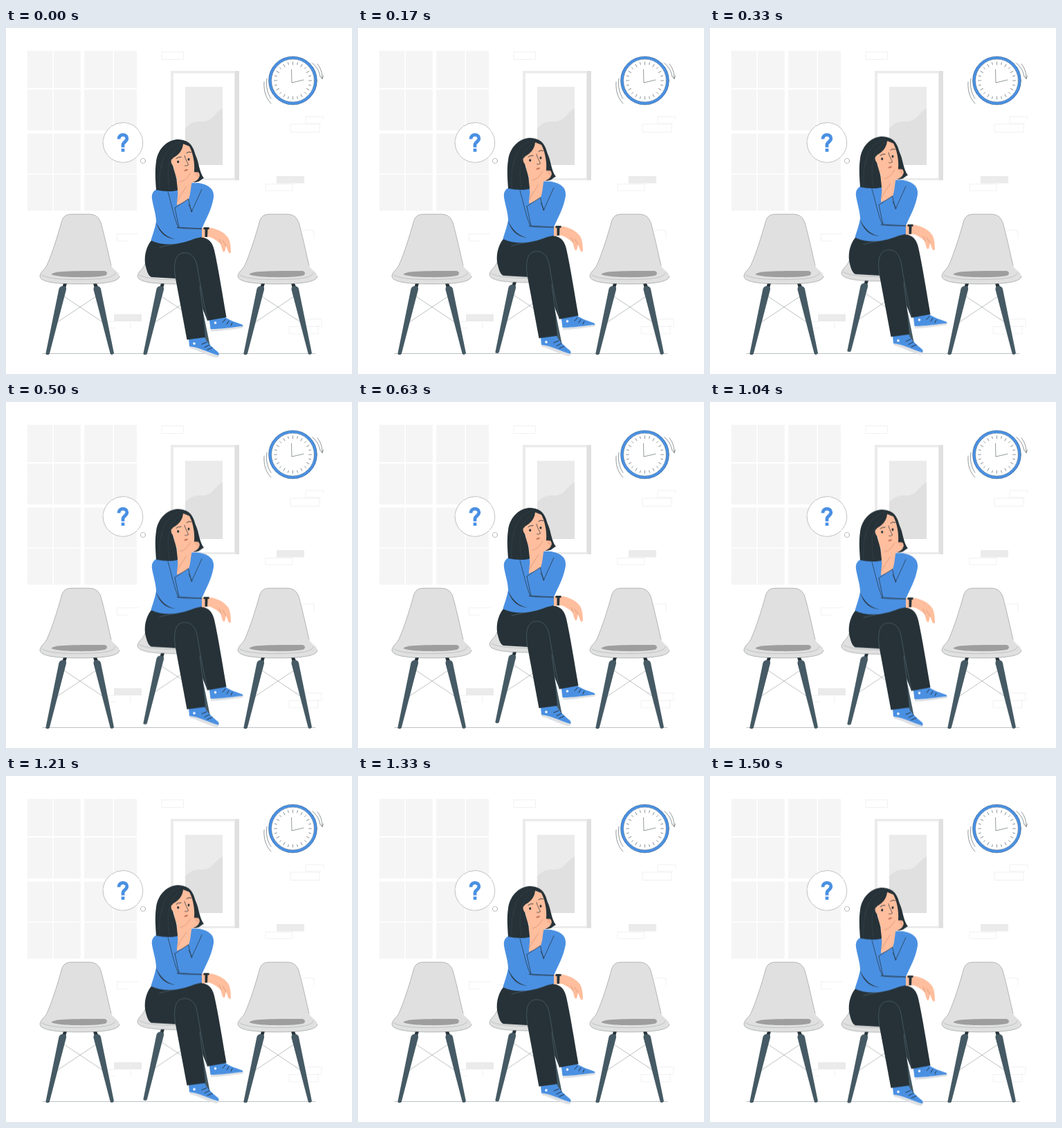
These frames come from a looping animation (500x500 px, 1.54 s). An HTML page:

```html
<!DOCTYPE html>
<html lang="en">
<head>
<meta charset="utf-8">
<title>Waiting</title>
<style>
  html, body { margin: 0; width: 100%; height: 100%; overflow: hidden; background: #fff; }
  svg { display: block; width: 100vw; height: 100vh; }
  .pane { fill: #f5f5f5; }
  .brick { fill: none; stroke: #ebebeb; stroke-width: .7; }
  .pale { fill: #ebebeb; }
  .blue { fill: #4a90e2; }
  .dark { fill: #263238; }
  .skin { fill: #ffbe9d; }
  .leg { fill: #455a64; }
  .line { fill: none; stroke: #263238; stroke-width: .7; stroke-linecap: round; stroke-linejoin: round; }
  .thin { stroke-width: .5; }
  .faint { stroke-width: .5; stroke-opacity: .6; }
  .fold { stroke: #5b6f79; stroke-width: .6; }
  .lock { stroke: #3b4850; stroke-width: .5; }
  .crease { stroke: #b87a60; stroke-width: .45; }
  .white { fill: #fff; }
  .sole { fill: #dfe1e4; }
</style>
</head>
<body>
<svg viewBox="0 0 500 500" xmlns="http://www.w3.org/2000/svg">
  <defs>
    <g id="chair">
      <path class="dark" d="M83 369H88L86 376H81ZM126 369H131L134 376H128Z"/>
      <path class="line faint" d="M84 388L141 426M130 388L73 426"/>
      <path class="leg" d="M76.500 377Q78 373 82 373Q88 373 87 378L62.800 471Q60 473.500 57.300 471Z"/>
      <path class="leg" d="M126.500 378Q126 373 131 373Q136 373 137 377L156 470Q153.500 473.500 150.800 471Z"/>
      <path fill="#e0e0e0" d="M49 358C51 351 56 349 59 343C67 325 75 299 80 281C82 273 86 269 95 269H119C129 269 134 273 137 281C142 298 147 322 152 343C154 350 163 351 164 359C163 367 142 370 106 370C70 370 49 367 49 358Z"/>
      <path class="line faint" d="M164 359C163 367 142 370 106 370C70 370 49 367 49 358C51 351 56 349 59 343C67 325 75 299 80 281C82 273 86 269 95 269H119C129 269 134 273 137 281C142 298 147 322 152 343"/>
      <path class="line faint" style="stroke-opacity:.35" d="M52 357C62 363 88 364 112 363.500C139 363 156 361 158 354"/>
      <path fill="#9e9e9e" d="M65.500 356C70 351 92 351 142 351C146 351.500 147.500 355 144 357.500C136 361 75 361.500 65.500 356Z"/>
    </g>
  </defs>

  <g id="panes"></g>
  <g id="bricks"></g>

  <path class="pale" d="M238 62H331V220H238Z"/>
  <path fill="#e0e0e0" d="M331 62H337V220H331Z"/>
  <path class="white" d="M242 65.500H330V217H242Z"/>
  <path class="pale" d="M259 85H313V198H259Z"/>
  <path fill="#e0e0e0" d="M259 145C266 137 274 134.500 283 135C299 136 302 121 313 116V198H259Z"/>

  <g>
    <circle class="white" cx="414.500" cy="76" r="33"/>
    <circle cx="414.500" cy="76" r="33" fill="none" stroke="#4a90e2" stroke-width="4.200"/>
    <circle class="line faint" cx="414.500" cy="76" r="35"/>
    <circle class="line faint" cx="414.500" cy="76" r="30.800"/>
    <g id="ticks"></g>
    <path class="line thin" d="M412.500 60L413 79L430 75"/>
    <path class="line thin" d="M377 73C375 84 378 95 383 102M373 78C372 91 376 102 383 109M443 51C450 57 453 64 454 70M450 52C455 58 457 65 457 73M454.500 70L457 73.500L458.500 69"/>
  </g>

  <path class="line faint" d="M53 470.500H447"/>

  <circle class="white" cx="169" cy="165.500" r="29"/>
  <circle class="line faint" cx="169" cy="165.500" r="28.800" stroke-dasharray="22 1.500"/>
  <circle class="line faint" cx="198" cy="192" r="3.600" style="fill:#fff"/>
  <path d="M163 160.500C163 156.500 165.500 154.300 169 154.300C172.500 154.300 174.800 156.500 174.800 159.500C174.800 164.500 169 164.500 169 169V172.500" fill="none" stroke="#4a90e2" stroke-width="4.800"/>
  <path class="blue" d="M166.600 174.300H171.400V178.800H166.600Z"/>

  <use href="#chair"/>
  <use href="#chair" x="286"/>

  <g id="sitter">
    <use href="#chair" x="141"/>

    <!-- shoes -->
    <path class="sole" d="M264.500 458L266 463C276 465 292 474 304 476.500Q308.500 475.500 308 471Z"/>
    <path class="blue" d="M264 449L287 446.500C290 455 300 463 306 468Q309 471 306.500 473C294 470 279 461 265 460Z"/>
    <path class="sole" d="M296 433V438.500C312 438 328 435.500 342 433.500Q344 432 342 429Z"/>
    <path class="blue" d="M293.500 419L315 416.500C321 422 334 426 341 428.500Q343.500 430 341.500 431C326 432.500 312 435 295.500 435Z"/>
    <circle class="white" cx="272" cy="456" r="1.800"/>
    <circle class="white" cx="302.500" cy="426" r="1.800"/>
    <path class="line" style="stroke-width:1" d="M283 457L290 454M287 461.500L294 458M291 465L298 462M313 425.500L317 421M319 428L322 423.500M325 430L327 426"/>

    <!-- trousers -->
    <path class="dark" d="M210 307C201 318 199 334 202 345C204 353 206 358 210 360L245 362L261.500 450.500L288 447L284 405L291 423L318.500 418C313 386 307 348 301 321C298 309 293 304 282 302L240 300Z"/>
    <path class="line fold" d="M245 362C242 343 243 326 257 325C270 324 275 335 277 348C281 374 287 402 291 422M222 317C238 312 256 311 273 304M280 373L285 410"/>

    <!-- jumper -->
    <path class="blue" d="M222 231C213 234 210 239 211 247C213 259 217 270 217 280C215 291 211 301 209.500 307C228 316 252 313 272 304.500L283 302V290C289 276 297 263 300 245C301 233 294 227 279 224L248 223Z"/>
    <path class="skin" d="M247 218L270 219C266 228 268 240 263 249L247 256C247 246 250 239 247 232Z"/>
    <path class="line crease" d="M262 226C259 233 252 240 248 250"/>
    <path class="blue" d="M244 260L263.500 247L269 266L262 287L250 291Z"/>
    <path class="line" d="M244 260L263.500 247L268 266L283 233M244 260L250 288M234 237C239 254 243 275 249 288L283 290M269 265L264 255"/>
    <path class="dark" d="M217 281C221 294 229 304 245 305C232 303 223 294 217 281Z"/>
    <path class="line" d="M247 288.500C259 290.500 270 290 284 290"/>

    <!-- forearm and watch -->
    <path class="skin" d="M283 289L294 288.500C305 290 315 295 321 303C324.500 309 325 318 325 324.500Q322.500 327 321 323L318 315L316.500 322Q315 325 313 322L310 312C306 308 300 304 294 302L283 303Z"/>
    <path class="line crease" d="M313 307L318 315M308 305L311 312"/>
    <path class="dark" d="M285.500 288H293.500V291H291.500L291 302H287.500V291H285.500Z"/>

    <!-- head -->
    <path class="dark" d="M250 162C268 162 271 174 274 184C279 194 279 208 286 217C281 219 280 223 272 223L255 220Z"/>
    <path class="skin" d="M240 186L255 167L265 171C270 180 273 195 272 207C269 215 263 221 257 222.500C251 223 247 219 244 211Z"/>
    <path class="skin" d="M252 221C260 221 263 213 266 210C268 206 271 207 272 208L278 208.500Q281 212 279 216C276 222 270 222 267 225L261 229H252Z"/>
    <path class="line crease" d="M252 222C260 221 264 213 267 209M272 209Q277 208 277.500 212M274 212Q278 212 278 216"/>
    <path class="dark" d="M217 234C216 220 215 206 217 193C219 177 230 163 247 161C256 160.500 264 164 268 171C263 167.500 259 167 256 167.500C255 177 250 183 241 188C239 197 244 207 246.500 218C247 226 248 231 248 234.500C238 237 227 236 217 234Z"/>
    <path class="line lock" d="M252 165C238 169 226 182 225 201M239 190C232 197 234 219 236 234M225 196C221 210 222 222 222 233M253 169C245 175 238 182 237 189"/>
    <path class="skin" d="M240.500 189C237 190.500 238.500 198 243 200L245 193Z"/>
    <path class="line" style="stroke-width:.9" d="M246 188.500Q249 186 253 186.500M261 180.500Q264 178 267.500 179.500"/>
    <path class="line" d="M258 184.500C259 190 263 195 263.500 198Q261 199.800 258.500 199"/>
    <path fill="#c2705c" d="M257 206.300Q260 203 263.500 204.500Q260.500 208 257 206.300Z"/>
    <ellipse class="dark" cx="248.700" cy="193.300" rx="1.500" ry="1.900"/>
    <ellipse class="dark" cx="264" cy="189.800" rx="1.500" ry="1.900"/>
  </g>
</svg>
<script>
  const NS = "http://www.w3.org/2000/svg";
  const byId = id => document.getElementById(id);

  function add(parent, tag, attrs) {
    const el = document.createElementNS(NS, tag);
    for (const key in attrs) el.setAttribute(key, attrs[key]);
    parent.append(el);
  }

  // Window panes: [start, size] per column and row
  const cols = [[31, 36.5], [69, 39], [113, 41.5], [156, 33]];
  const rows = [[33, 54], [89, 59], [152.5, 58], [212, 52]];
  for (const [x, width] of cols)
    for (const [y, height] of rows)
      add(byId("panes"), "rect", { x, y, width, height, class: "pane" });

  // Wall bricks
  const bricks = [
    "M225 34.500H256.500V45.500H225Z", "M433 138V128H459V133M433 138H455",
    "M411 139H453V150.500H411Z", "M375 225.500H414V235H375Z",
    "M191 297.500H160.500V308H176", "M428 292H445V303",
    "M148 424.500H157M148 433.500H158M180 425V434",
    "M417 420.500H456V431H448", "M409 431.500H451V442H409Z"
  ];
  for (const d of bricks) add(byId("bricks"), "path", { d, class: "brick" });
  for (const [x, y] of [[391, 214], [156, 413.5]])
    add(byId("bricks"), "rect", { x, y, width: 40, height: 10.5, class: "pale" });

  // Clock ticks
  for (let i = 0; i < 24; i++)
    add(byId("ticks"), "path", {
      d: `M414.500 ${i % 2 ? 52 : 53}V49`, class: "line thin",
      transform: `rotate(${i * 15} 414.5 76)`
    });

  // Steady rise and fall of the sitter and her chair
  byId("sitter").animate(
    [0.4, -9.4, 0.4].map(y => ({ transform: `translate(0px, ${y}px)` })),
    { duration: 1540, delay: -35, iterations: Infinity, easing: "linear" }
  );
</script>
</body>
</html>
```
